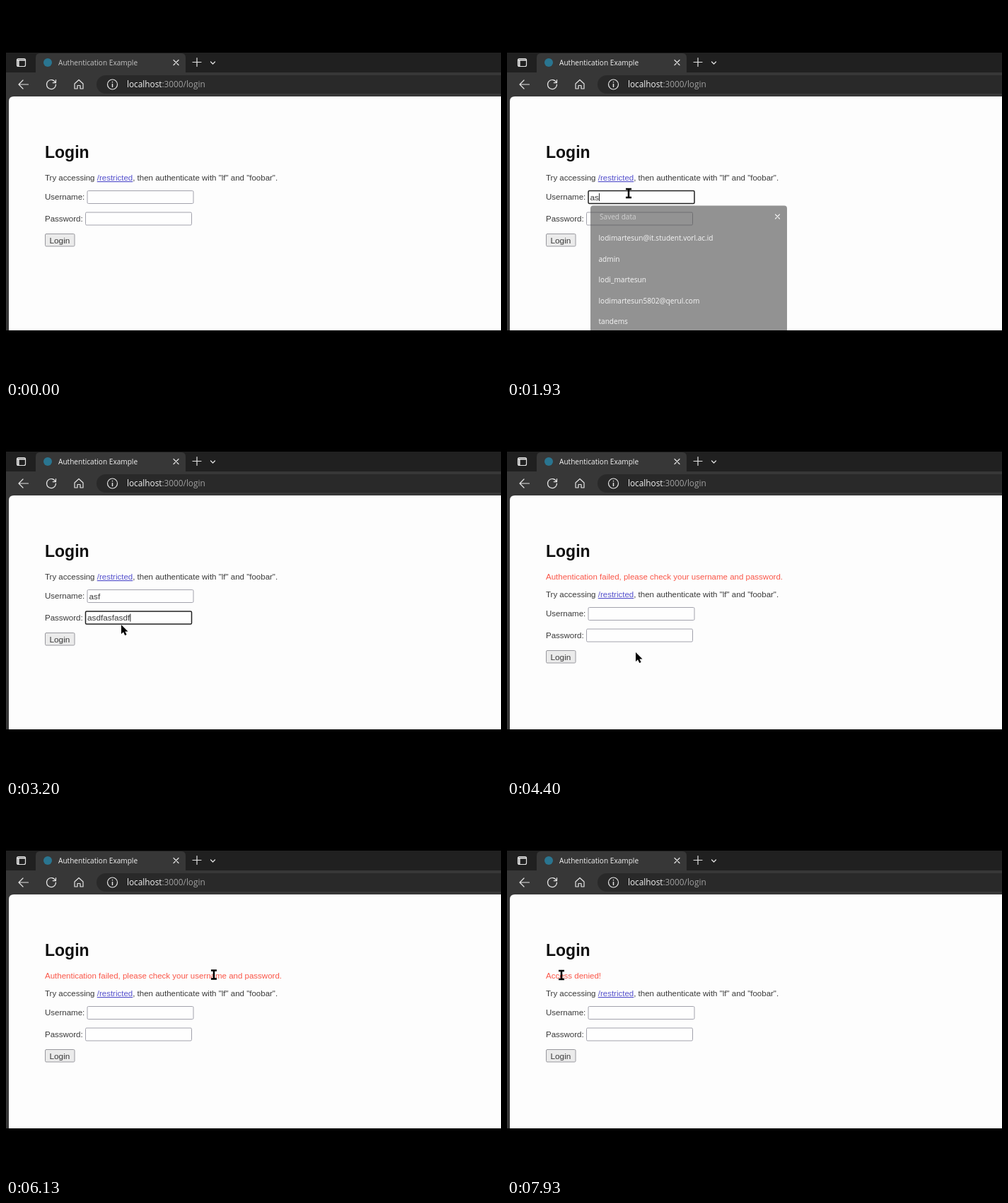
Animation of 700 by 525 pixels, one loop 8000 ms. Source, as an HTML page:

```html
<!DOCTYPE html>
<html lang="en">
<head>
<meta charset="utf-8">
<title>Login form</title>
<style>
  html, body { margin: 0; width: 100%; height: 100%; overflow: hidden; background: #000; }
  svg { display: block; width: 100%; height: 100%; }
  text { font: 11.5px "Liberation Sans", Arial, sans-serif; fill: #3a3a3a; white-space: pre; }
  .ui { font: 10.1px "Open Sans", "Noto Sans", sans-serif; fill: #f2f2f2; }
  .url { font-size: 11.8px; }
  .entry, .button { font-size: 11.8px; }
  .heading { font-size: 23px; font-weight: bold; fill: #101010; }
  .icon { fill: none; stroke: #e4e4e4; stroke-width: 1.2; stroke-linecap: round; stroke-linejoin: round; }
  .field { fill: #fefefe; stroke: #a2a2ac; }
  .field.focus { stroke: #222; stroke-width: 1.5; }
  .link { fill: #5450cc; text-decoration: underline; }
  .error { fill: #fa5648; }
</style>
</head>
<body>
<svg viewBox="0 0 700 525" preserveAspectRatio="none">
  <defs><clipPath id="view"><rect y="66" width="700" height="393"/></clipPath></defs>
  <rect width="700" height="525"/>
  <g clip-path="url(#view)">
    <rect y="66" width="700" height="394" fill="#202020"/>
    <path d="M0 94H42V73q0-6 6-6H248q6 0 6 6V94H700V460H0Z" fill="#373737"/>
    <path d="M700 98H141a13 13 0 0 0 0 26H700Z" fill="#292929"/>
    <path d="M4 460V135q0-7 7-7H700V460Z" fill="#fdfdfd"/>

    <circle cx="59" cy="80" r="6" fill="#2a7590"/>
    <text id="title" class="ui" x="74" y="83.5">Authentication Example</text>
    <g class="icon">
      <rect x="15.5" y="74.5" width="12" height="11" rx="2"/>
      <path d="M16 76.5H27M17.5 78V85" stroke-width="2.2"/>
      <path d="M237 76.5l7 7m0-7l-7 7M264 79.5h12m-6-6v12M289.5 79l3 3l3-3"/>
      <path d="M31.5 111H18m6-6l-6 6l6 6"/>
      <path d="M70 108.5A6.5 6.5 0 1 0 70.5 111M70.5 104.5v4.2h-4.2"/>
      <path d="M97 110l6-5.5l6 5.5v7h-4v-4.5h-4v4.5h-4Z"/>
      <circle cx="150.5" cy="111" r="7"/>
      <path d="M150.5 110.5v4M150.5 107.6v.1" stroke-width="1.5"/>
    </g>
    <text class="ui url" x="171" y="115">localhost<tspan fill="#a0a0a0">:3000/login</tspan></text>

    <text class="heading" x="55" y="215">Login</text>
    <text id="error" class="error" x="55" y="247"></text>
    <g id="form">
      <text x="55" y="247">Try accessing <tspan class="link">/restricted</tspan>, then authenticate with "lf" and "foobar".</text>
      <text x="55" y="274">Username:</text>
      <rect id="userField" class="field" x="115" y="261.5" width="150" height="18" rx="1.5"/>
      <text id="user" class="entry" x="117.5" y="274.5"></text>
      <text x="55" y="304.5">Password:</text>
      <rect id="passField" class="field" x="112.5" y="292" width="150" height="18" rx="1.5"/>
      <text id="pass" class="entry" x="115" y="305"></text>
      <rect x="55.5" y="322.5" width="41.5" height="17.5" rx="1.5" fill="#ebebeb" stroke="#98989e"/>
      <text class="button" x="61.5" y="335.5">Login</text>
      <path id="caret" stroke="#222" d="M0 0v11"/>
    </g>

    <g id="popup">
      <rect x="118" y="282.5" width="278" height="190" rx="4" fill="#4a4a4a"/>
      <text class="ui" x="131" y="301.5" opacity=".6">Saved data</text>
      <path class="icon" d="M379.5 295l6 6m0-6l-6 6"/>
    </g>

    <g id="pointer">
      <path id="arrow" d="M0 0V13L3 10.2L5.2 15L7.6 14L5.4 9.4H9.5Z"/>
      <path id="beam" d="M-4-6H4M-4 6H4M0-6V6" stroke="#000" stroke-width="2.5"/>
      <path id="hand" d="M-1.500 1q1.500-2 3 0V5.500l5 1.200q1.800.5 1.500 2.500l-1 6.300H-.5L-4.500 10q-.5-2 1.500-1.500l1.500 1Z" stroke="#000" stroke-width=".6"/>
    </g>
  </g>
</svg>
<script>
const LOOP = 8000;
const CLICK_USER = 1400, CLICK_PASS = 2400, SUBMIT = 3600, DENIED = 7080;
const $ = id => document.getElementById(id);

// time, x, y of the pointer
const PATH = [
  [870, 420, 457], [1330, 172, 265], [2080, 172, 265], [2350, 168, 302], [2600, 168, 302],
  [2850, 163, 311], [3450, 163, 311], [3900, 182, 350], [4400, 182, 350], [4700, 355, 243],
  [5050, 58, 243], [5250, 120, 246], [5450, 91, 249], [5650, 91, 249], [6000, 110, 189],
  [6270, 495, 299], [6580, 159, 265], [7120, 159, 265], [7700, 97, 249], [7830, 86, 235],
  [7930, 77, 242]
];
const USER_KEYS = [1770, 1860, 1990];
const PASS_KEYS = Array.from({ length: 11 }, (_, i) => 2540 + i * 60);

const SAVED = ["lodimartesun@it.student.vorl.ac.id", "admin", "lodi_martesun", "lodimartesun5802@qerul.com", "tandems"];
SAVED.forEach((label, i) => {
  const row = document.createElementNS("http://www.w3.org/2000/svg", "text");
  row.setAttribute("class", "ui");
  row.setAttribute("x", 129.5);
  row.setAttribute("y", 332 + i * 29.6);
  row.textContent = label;
  $("popup").append(row);
});

const clamp = v => Math.max(0, Math.min(1, v));
const ease = v => v * v * (3 - 2 * v);
const show = (id, on) => $(id).setAttribute("visibility", on ? "visible" : "hidden");
const typed = (word, keys, t) => t < SUBMIT ? word.slice(0, keys.filter(k => k <= t).length) : "";
const formShift = t => t < SUBMIT ? 0 : 25;

// Text and fields show a beam, the link a hand, empty space an arrow.
function pointerShape(x, y, t) {
  const over = (x0, y0, x1, y1) => x >= x0 && x <= x1 && y >= y0 && y <= y1;
  const errorEnd = t < SUBMIT ? 0 : t < DENIED ? 389 : 133;
  if (over(55, 195, 117, 219) || over(55, 237, errorEnd, 248)) return "beam";
  y -= formShift(t);
  if (over(129, 237, 180, 248)) return "hand";
  const onForm = over(55, 237, 384, 248) || over(55, 261, 265, 280) || over(55, 291, 263, 310);
  return onForm ? "beam" : "arrow";
}

function drawPointer(t) {
  const i = PATH.findLastIndex(step => step[0] <= t);
  const [t0, x0, y0] = PATH[Math.max(i, 0)];
  const [t1, x1, y1] = PATH[Math.min(i + 1, PATH.length - 1)];
  const k = t1 > t0 ? ease(clamp((t - t0) / (t1 - t0))) : 0;
  const x = x0 + (x1 - x0) * k, y = y0 + (y1 - y0) * k;
  const shape = pointerShape(x, y, t);
  $("pointer").setAttribute("transform", `translate(${x} ${y})`);
  for (const id of ["arrow", "beam", "hand"]) show(id, i >= 0 && id === shape);
}

function drawForm(t) {
  const inUser = t >= CLICK_USER && t < CLICK_PASS;
  const inPass = t >= CLICK_PASS && t < SUBMIT;
  $("user").textContent = typed("asf", USER_KEYS, t);
  $("pass").textContent = typed("asdfasfasdf", PASS_KEYS, t);
  $("userField").classList.toggle("focus", inUser);
  $("passField").classList.toggle("focus", inPass);
  show("caret", inUser || inPass);
  const entry = $(inPass ? "pass" : "user");
  const x = +entry.getAttribute("x") + entry.getComputedTextLength() + 0.5;
  $("caret").setAttribute("transform", `translate(${x} ${inPass ? 295.5 : 265})`);
  $("form").setAttribute("transform", `translate(0 ${formShift(t)})`);
  $("error").textContent = t < SUBMIT ? "" : t < DENIED
    ? "Authentication failed, please check your username and password." : "Access denied!";
}

function draw(now) {
  const t = now % LOOP;
  drawForm(t);
  drawPointer(t);
  $("title").style.fill = t < CLICK_USER ? "#c4c4c4" : "#f2f2f2";
  $("popup").setAttribute("opacity", clamp((t - CLICK_USER - 40) / 120) * clamp((2020 - t) / 150));
}

const start = performance.now();
function tick() {
  draw(performance.now() - start);
  requestAnimationFrame(tick);
}
tick();
</script>
</body>
</html>
```
